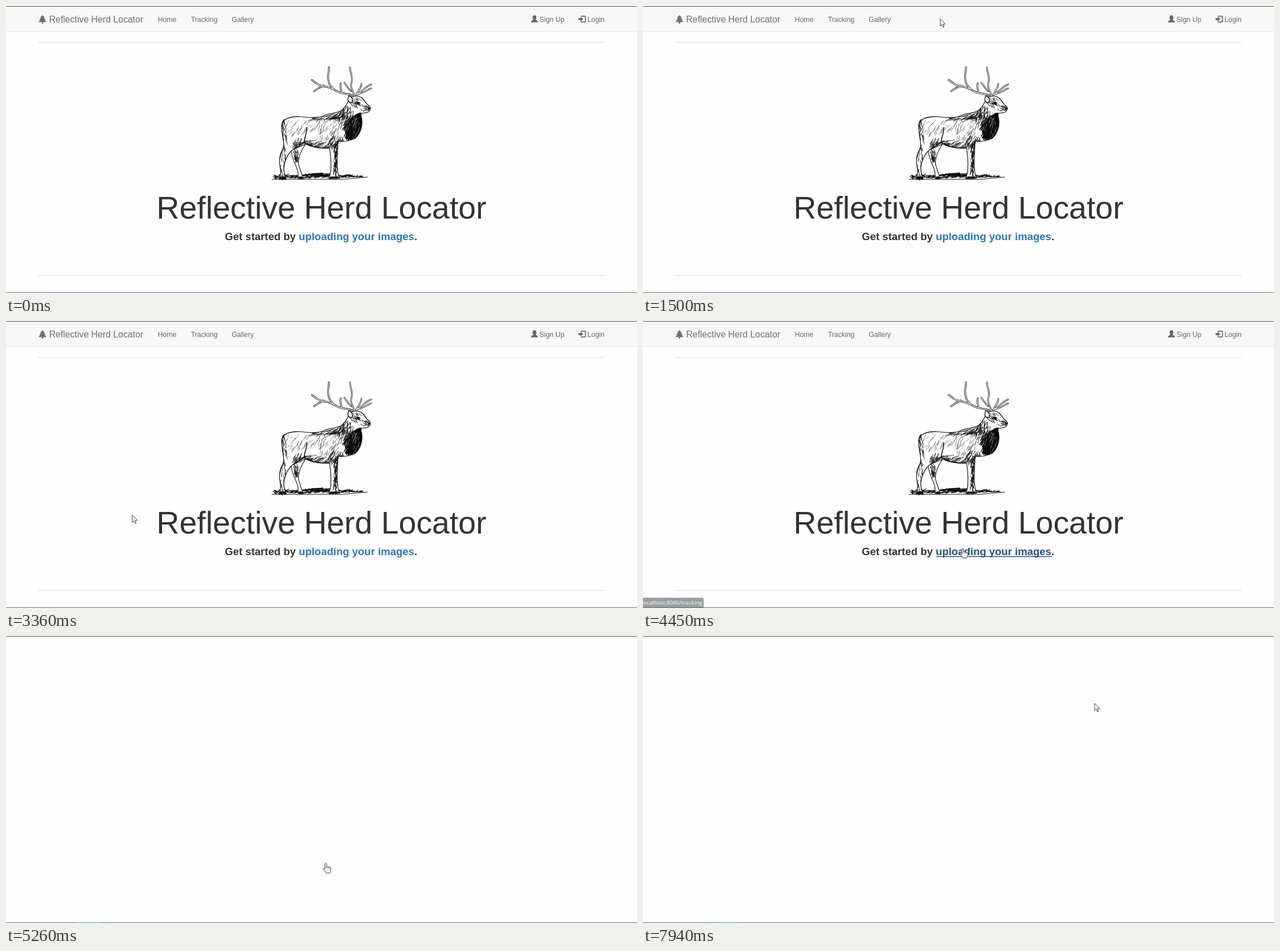
An HTML page for the animation above (7.99 s loop, 1108 by 505 pixels).

```html
<!DOCTYPE html>
<html lang="en">
<head>
<meta charset="utf-8">
<title>Reflective Herd Locator</title>
<style>
  html, body { margin: 0; width: 100%; height: 100%; overflow: hidden; background: #fefefe; }
  svg { display: block; width: 100vw; height: 100vh; font-family: "Liberation Sans", Arial, sans-serif; }
  .nav { font-size: 12.32px; fill: #666; }
  .brand { font-size: 15.84px; fill: #707070; }
  .nav.hover { fill: #333; }
  .brand.hover { fill: #4c4c4c; }
  .link { fill: #2b76b9; }
  .link.hover { fill: #23527c; }
  #underline { stroke: #23527c; stroke-width: 1.4; }
  .cursor { fill: #fff; stroke: #3c3c48; stroke-width: 1; stroke-linejoin: round; }
</style>
</head>
<body>
<svg viewBox="0 0 1108 505" preserveAspectRatio="none">
  <rect width="1108" height="505" fill="#fefefe"/>
  <g id="page">
    <rect width="1108" height="45" fill="#f8f8f8"/>
    <path d="M0 45H1108" stroke="#e2e2e2"/>
    <path d="M56 64H1051M56 474.3H1051" stroke="#e6e6e6" stroke-width="1.4"/>

    <g class="brand" id="brand">
      <path d="M64 16L68.2 20.7H66.5L69.6 24.3H67.7L71.4 28.3H65.3V31H62.7V28.3H56.6L60.3 24.3H58.4L61.5 20.7H59.8Z"/>
      <text x="75.7" y="29.4">Reflective Herd Locator</text>
    </g>
    <text class="nav" id="home" x="266.5" y="27.6">Home</text>
    <text class="nav" id="track" x="324.7" y="27.6">Tracking</text>
    <text class="nav" id="gallery" x="396.2" y="27.6">Gallery</text>
    <g class="nav">
      <path d="M928 16.2C930.5 16.2 931.6 18 931.4 20.3C931.2 22.2 930.4 23.1 929.8 23.7C930 25 934.2 25.3 934.2 28.8H921.8C921.8 25.3 926 25 926.2 23.7C925.6 23.1 924.8 22.2 924.6 20.3C924.4 18 925.5 16.2 928 16.2Z"/>
      <text x="936.7" y="27.6">Sign Up</text>
      <path d="M1005.4 21.3H1009V18.8L1013.6 23L1009 27.2V24.7H1005.4Z"/>
      <path d="M1009.5 17.8H1016.2Q1017.5 17.8 1017.5 19.2V26.8Q1017.5 28.2 1016.2 28.2H1009.5" fill="none" stroke="#666" stroke-width="1.7"/>
      <text x="1021" y="27.6">Login</text>
    </g>

    <g id="elk" fill="#fff" stroke="#111" stroke-linecap="round" stroke-linejoin="round"></g>

    <text x="554" y="373.6" font-size="55.44" fill="#333" text-anchor="middle">Reflective Herd Locator</text>
    <g font-size="18.55" font-weight="bold">
      <text x="384.3" y="412.4" fill="#333">Get started by <tspan class="link" id="upload">uploading your images</tspan>.</text>
    </g>
    <path id="underline" d="M515 414.5H718"/>
  </g>

  <g id="status">
    <path d="M0 487H104Q106.5 487 106.5 489.5V505H0Z" fill="#77797b"/>
    <text x="104" y="499.4" text-anchor="end" fill="#fff" font-size="9.8" font-family="'Open Sans', sans-serif">localhost:8080/tracking</text>
  </g>

  <path d="M0 .5H1108" stroke="#494d52"/>
  <path d="M0 504.5H1108" stroke="#557888"/>
  <path id="accent" d="M125 504.5H165" stroke="#3ba2dc"/>

  <g id="cursor">
    <path class="cursor" id="arrow" d="M.5 .5V13.2L3.3 10.6L5.4 15.2L7.4 14.3L5.4 9.9H9.8Z"/>
    <g id="hand">
      <path class="cursor" d="M-1.4 1.6Q-1.2 .4 0 .4T1.4 1.6V6.4Q2.6 5.2 4.2 6.9Q5.8 5.9 6.8 7.6Q8.6 7.2 8.8 9V12Q8.6 15 7 17.6H.5Q-1 14.5 -4 11.6Q-5.2 10 -4 9.4Q-3 9 -1.4 11Z"/>
      <path class="cursor" d="M1.4 6.4V9M4.2 6.9V9.4M6.8 7.6V9.8"/>
    </g>
  </g>
</svg>

<script>
const $ = id => document.getElementById(id);
const LOOP = 7990;

let seed = 11;
const rnd = () => (seed = (seed * 16807) % 2147483647) / 2147483647;

// Short pen strokes scattered in an ellipse, all leaning about the same way.
function hatch(count, cx, cy, rx, ry, angle, len, width) {
  let d = '';
  for (let i = 0; i < count; i++) {
    const a = rnd() * 6.283, r = Math.sqrt(rnd());
    const x = cx + rx * r * Math.cos(a), y = cy + ry * r * Math.sin(a);
    const lean = (angle + rnd() * 30 - 15) * Math.PI / 180;
    const l = len * (.5 + rnd() * .7);
    const dx = l * Math.cos(lean), dy = l * Math.sin(lean);
    d += `M${x.toFixed(1)} ${y.toFixed(1)}q${(dx / 2 + 1).toFixed(1)} ${(dy / 2).toFixed(1)} ${dx.toFixed(1)} ${dy.toFixed(1)}`;
  }
  return `<path d="${d}" fill="none" stroke-width="${width}"/>`;
}

// A hollow tine: dark stroke with a thinner light core.
const horn = (d, w) => `<path d="${d}" fill="none" stroke-width="${w}"/>
  <path d="${d}" fill="none" stroke="#fff" stroke-width="${w * .42}"/>`;

function drawElk() {
  const body = 'M603 163C600 170 596 178 590 183C583 189 571 188 560 192C550 198 535 197 520 195C508 194 496 196 490 200'
    + 'C484 205 483 213 485 224C487 238 489 246 486 252C481 260 479 270 481 282C483 292 483 298 480 304L492 305'
    + 'C490 298 487 292 488 284C489 273 493 264 500 256C507 249 516 247 524 240C534 247 550 251 568 250'
    + 'C571 265 571 280 570 292L567 304H581C578 296 578 285 579 270C580 255 582 246 584 238C592 239 604 237 613 233'
    + 'C622 225 626 212 625 202C625 196 622 192 624 189C629 188 634 188 637 186L640 182C641 178 637 175 634 173'
    + 'C630 167 626 161 620 159C614 157 608 159 603 163Z';
  const mane = 'M622 188C614 189 604 199 601 208C596 217 600 227 595 232C601 236 610 235 614 232C622 225 626 212 625 202C626 196 623 193 625 189Z';
  const far = 'M501 254C501 266 507 276 511 286C514 294 513 300 513 304H522C519 296 517 289 514 280C512 270 516 258 526 243Z'
    + 'M575 250C577 275 575 290 576 303H586C582 296 580 280 583 246Z';
  const tall = 'M608 157C596 153 586 155 576 147C571 142 567 138 566 130C564 120 568 114 567 108'
    + 'M576 147C562 139 552 143 545 136L537 130M558 140C551 142 548 146 541 150M589 153C589 146 585 141 588 136';
  const fan = 'M612 158C610 150 603 143 607 133C609 124 604 117 604 108M612 157C624 153 628 144 641 138'
    + 'M618 155C630 152 633 148 641 145M616 154C620 147 624 143 624 137M606 150C600 145 598 139 594 135';
  $('elk').innerHTML = `
    <clipPath id="skin"><path d="${body}"/></clipPath>
    <g stroke="#111">
      ${hatch(150, 550, 300.5, 80, 3.2, -12, 7, 1.1)}
      ${hatch(55, 548, 297, 28, 2, 0, 8, 1.5)}
      ${hatch(24, 478, 299, 11, 3, 40, 6, 1.1)}
      <path d="M467 305H590L635 301" stroke-width="1"/>
    </g>
    <path d="${far}" stroke-width="1.1"/>
    ${hatch(24, 508, 261, 4, 12, 70, 8, 1)}
    ${hatch(24, 579, 270, 2, 26, 85, 8, 1)}
    <path d="${body}" stroke-width="1.2"/>
    <g clip-path="url(#skin)">
      ${hatch(55, 566, 193, 32, 6, 155, 11, .9)}
      ${hatch(85, 597, 192, 14, 18, 112, 9, .9)}
      ${hatch(50, 570, 215, 24, 22, 118, 9, .55)}
      ${hatch(40, 515, 212, 28, 16, 125, 8, .5)}
      ${hatch(75, 547, 243, 28, 8, 152, 11, .8)}
      ${hatch(45, 516, 242, 10, 12, 115, 9, .9)}
      ${hatch(45, 582, 237, 13, 10, 115, 9, 1)}
      ${hatch(30, 487, 225, 6, 28, 82, 8, .7)}
      ${hatch(28, 487, 271, 5, 30, 96, 9, .8)}
      ${hatch(28, 578, 270, 3, 32, 91, 10, 1)}
      ${hatch(32, 612, 168, 9, 9, 45, 6, .9)}
      ${hatch(16, 629, 178, 8, 7, 35, 5, .8)}
      <path d="${mane}" fill="#080808"/>
      ${hatch(65, 607, 212, 12, 23, 112, 10, 1.6)}
      <g stroke="#fff">${hatch(18, 611, 213, 10, 19, 110, 6, .45)}</g>
    </g>
    <path d="M489 200C484 203 485 208 484 212M524 240C523 231 529 225 528 214M524 241C535 248 551 251 568 249" fill="none" stroke-width="1.6"/>
    <path d="M480 303L482 300H490L492 305H480ZM513 304L515 300H520L522 304ZM567 304L570 300H583L586 303Z" fill="#111" stroke="none"/>
    <path d="M607 170C600 170 599 164 602 158C607 159 610 164 607 170Z" stroke-width="1.4"/>
    <path d="M615 171Q618 167 622 171ZM636 178L640 180L637 183Z" fill="#080808"/>
    <path d="M628 184Q633 182 638 184" fill="none"/>
    ${horn(tall, 3)}${horn(fan, 2.7)}`;
}
drawElk();

// Pointer track: time, x, y.
const track = [
  [110, 1051, 479], [500, 1044, 260], [900, 1030, 56], [1500, 522, 22], [1700, 416, 20],
  [2050, 255, 21], [2320, 162, 26], [2520, 146, 32], [2570, 147, 36], [3360, 221, 341],
  [3410, 226, 342], [4170, 560, 398], [4450, 561.5, 399.5], [6440, 561.5, 399.5],
  [6780, 592, 399], [6920, 592, 399], [7710, 782, 155], [7940, 792.5, 118]
];

function pointer(t) {
  let i = 0;
  while (i < track.length - 2 && t > track[i + 1][0]) i++;
  const [t0, x0, y0] = track[i], [t1, x1, y1] = track[i + 1];
  const k = Math.min(1, Math.max(0, (t - t0) / (t1 - t0)));
  return [x0 + (x1 - x0) * k, y0 + (y1 - y0) * k];
}

// Clickable areas: id, left, top, right, bottom.
const areas = [
  ['brand', 43, 0, 254, 45], ['home', 254, 0, 312, 45], ['track', 312, 0, 384, 45],
  ['gallery', 384, 0, 448, 45], ['upload', 515, 396, 718, 417]
];

const ramp = (t, a, b) => Math.min(1, Math.max(0, (t - a) / (b - a)));
const show = (id, on) => $(id).setAttribute('visibility', on ? 'visible' : 'hidden');

function draw(t) {
  const [x, y] = pointer(t);
  const blank = t >= 4690;
  let over = '';
  for (const [id, l, top, r, b] of areas) {
    const hit = !blank && x >= l && x < r && y >= top && y < b;
    $(id).classList.toggle('hover', hit);
    if (hit) over = id;
  }
  const hand = over !== '' || (blank && t < 6440);
  $('page').style.display = blank ? 'none' : '';
  show('underline', over === 'upload');
  show('accent', blank);
  $('status').setAttribute('opacity', ramp(t, 4220, 4540) * (1 - ramp(t, 5060, 5260)));
  $('cursor').style.display = t < 110 ? 'none' : '';
  $('cursor').setAttribute('transform', `translate(${x.toFixed(1)} ${y.toFixed(1)})`);
  $('arrow').style.display = hand ? 'none' : '';
  $('hand').style.display = hand ? '' : 'none';
}

const start = performance.now();
function tick() {
  draw((performance.now() - start) % LOOP);
  requestAnimationFrame(tick);
}
tick();
</script>
</body>
</html>
```
